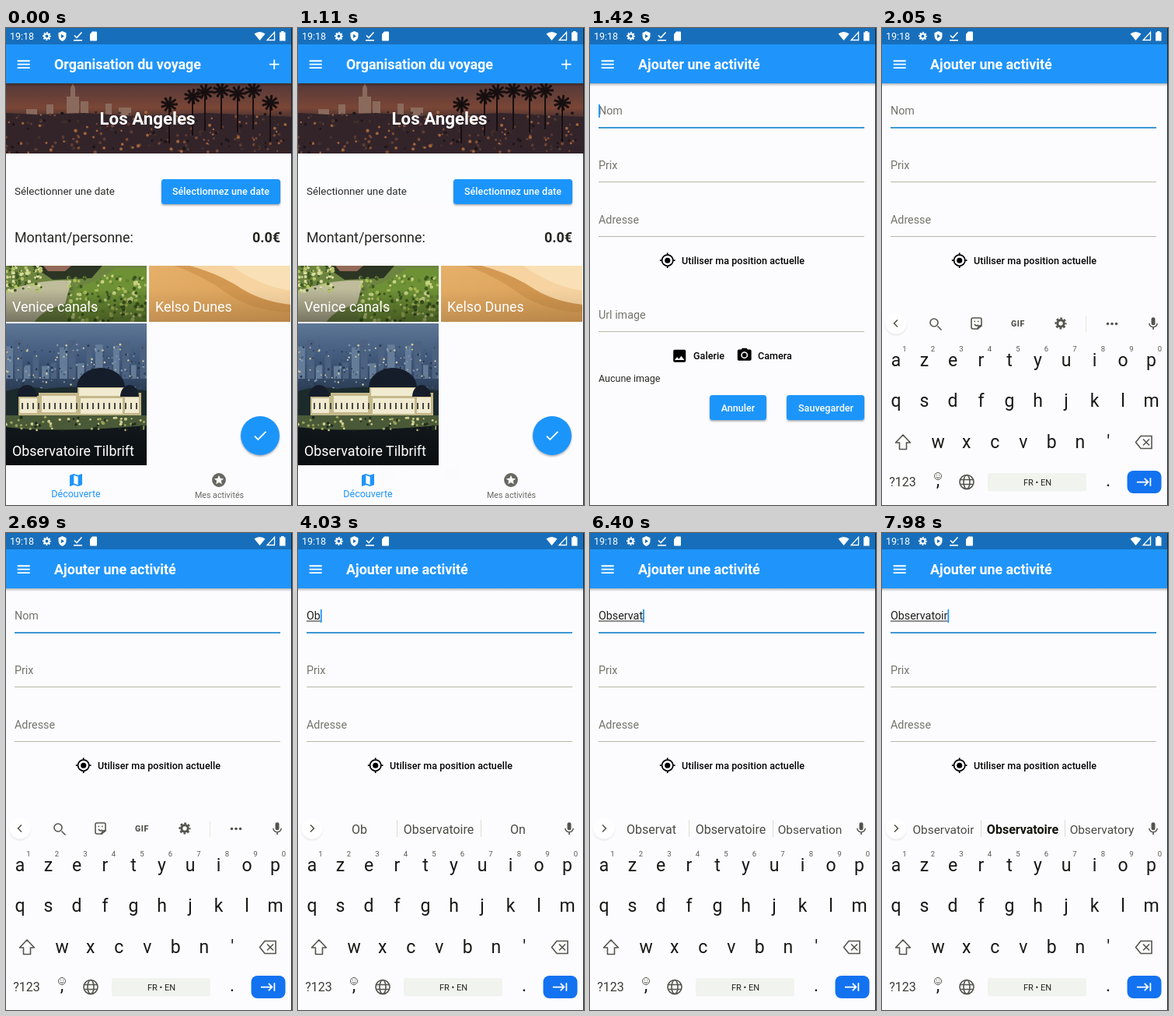
An HTML page for the animation above (8000 ms loop, 368 by 612 pixels).

```html
<!DOCTYPE html>
<html lang="fr">
<head>
<meta charset="utf-8">
<title>Organisation du voyage</title>
<style>
html, body { margin: 0; width: 100%; height: 100%; overflow: hidden; background: #fcfcfe; }
svg.stage { display: block; width: 100vw; height: 100vh; font: 14.3px Roboto, "Noto Sans", sans-serif; }
.blue { fill: #1f95fb; }
.title { font-size: 17.86px; font-weight: 600; fill: #fff; }
.btn { font-size: 12.5px; font-weight: 500; letter-spacing: .07px; }
.label { fill: #74746c; }
.tile { font-size: 17.86px; fill: #fff; }
.mid { text-anchor: middle; }
.key { font-size: 23px; text-anchor: middle; fill: #181816; }
.digit { font-size: 9.5px; text-anchor: middle; fill: #565650; }
.word { font-size: 16px; text-anchor: middle; fill: #4a4a44; }
.word.long { font-size: 15.4px; }
.word.best { font-weight: 700; fill: #14140c; }
.grey { fill: #54544e; }
.line { fill: none; stroke: #54544e; stroke-width: 1.6; }
#form { animation: rise 8s infinite, appear 8s infinite; }
#keyboard { animation: slide 8s infinite; }
@keyframes rise {
  0%, 13.69% { transform: translateY(153px); animation-timing-function: cubic-bezier(.4, 0, .2, 1); }
  17.44%, 100% { transform: none; }
}
@keyframes appear {
  0%, 13.69% { opacity: 0; animation-timing-function: ease-in; }
  17.44%, 100% { opacity: 1; }
}
@keyframes slide {
  0%, 19.5% { transform: translateY(256px); animation-timing-function: cubic-bezier(0, 0, .2, 1); }
  23%, 100% { transform: none; }
}
</style>
</head>
<body>
<svg class="stage" viewBox="0 0 368 612">
<defs>
  <symbol id="menu" viewBox="0 0 24 24"><path d="M3 18h18v-2H3zM3 13h18v-2H3zM3 6v2h18V6z"/></symbol>
  <symbol id="add" viewBox="0 0 24 24"><path d="M19 13h-6v6h-2v-6H5v-2h6V5h2v6h6z"/></symbol>
  <symbol id="check" viewBox="0 0 24 24"><path d="M9 16.17L4.83 12l-1.42 1.41L9 19 21 7l-1.41-1.41z"/></symbol>
  <symbol id="map" viewBox="0 0 24 24"><path d="M20.5 3L15 5.1 9 3 3.36 4.9Q3 5 3 5.4V20.5q0 .5.5.5L9 18.9l6 2.1 5.64-1.9q.36-.1.36-.5V3.5q0-.5-.5-.5zM15 19l-6-2.11V5l6 2.11z"/></symbol>
  <symbol id="stars" viewBox="0 0 24 24"><path d="M12 2a10 10 0 1 0 0 20a10 10 0 1 0 0-20zm4.23 16L12 15.45 7.77 18l1.12-4.81-3.73-3.23 4.92-.42L12 5l1.92 4.53 4.92.42-3.73 3.23z"/></symbol>
  <symbol id="image" viewBox="0 0 24 24"><path d="M21 19V5a2 2 0 0 0-2-2H5a2 2 0 0 0-2 2v14a2 2 0 0 0 2 2h14a2 2 0 0 0 2-2zM8.5 13.5l2.5 3 3.5-4.5 4.5 6H5z"/></symbol>
  <symbol id="camera" viewBox="0 0 24 24"><path d="M9 2L7.17 4H4a2 2 0 0 0-2 2v12a2 2 0 0 0 2 2h16a2 2 0 0 0 2-2V6a2 2 0 0 0-2-2h-3.17L15 2zm3 15a5 5 0 1 1 0-10a5 5 0 1 1 0 10z"/><circle cx="12" cy="12" r="3.2"/></symbol>
  <symbol id="locate" viewBox="0 0 24 24"><circle cx="12" cy="12" r="4"/><circle cx="12" cy="12" r="8" fill="none" stroke="#000" stroke-width="2"/><path d="M11 1h2v3h-2zM11 20h2v3h-2zM1 11h3v2H1zM20 11h3v2h-3z"/></symbol>
  <symbol id="gear" viewBox="0 0 24 24"><g fill="none" stroke="currentColor"><circle cx="12" cy="12" r="5.6" stroke-width="4"/><circle cx="12" cy="12" r="8.6" stroke-width="3" pathLength="16" stroke-dasharray="1.1 .9" stroke-dashoffset=".55"/></g></symbol>
  <symbol id="mic" viewBox="0 0 24 24"><rect x="9" y="2" width="6" height="12" rx="3"/><path d="M17.3 11a5.3 5.1 0 0 1-10.6 0H5a7 7 0 0 0 6 6.72V21h2v-3.28A7 7 0 0 0 19 11z"/></symbol>
  <symbol id="tab" viewBox="0 0 24 24"><path d="M11.59 7.41L15.17 11H1v2h14.17l-3.59 3.59L13 18l6-6-6-6zM20 6v12h2V6z"/></symbol>
  <linearGradient id="shade" x2="0" y2="1"><stop stop-opacity=".28"/><stop offset="1" stop-opacity="0"/></linearGradient>
  <linearGradient id="dusk" x2="0" y2="1"><stop stop-color="#55393a"/><stop offset=".35" stop-color="#7a4636"/><stop offset=".5" stop-color="#453030"/><stop offset="1" stop-color="#221a1c"/></linearGradient>
  <linearGradient id="haze" x2="0" y2="1"><stop stop-color="#5f7796"/><stop offset=".25" stop-color="#40587a"/><stop offset=".48" stop-color="#2c3d54"/><stop offset="1" stop-color="#0c1118"/></linearGradient>
  <linearGradient id="sand" x2="1" y2="1"><stop stop-color="#e6b06a"/><stop offset="1" stop-color="#d59a52"/></linearGradient>
  <linearGradient id="foot" x2="0" y2="1"><stop stop-opacity="0"/><stop offset="1" stop-opacity=".38"/></linearGradient>
  <filter id="soft" x="-20%" y="-30%" width="140%" height="180%"><feDropShadow dx="0" dy="1.5" stdDeviation="1.3" flood-opacity=".35"/></filter>
  <clipPath id="c-banner"><path d="M0 71h367v90H0z"/></clipPath>
  <clipPath id="c-canal"><path d="M0 305h181v72H0z"/></clipPath>
  <clipPath id="c-dune"><path d="M184 305h182v72H184z"/></clipPath>
  <clipPath id="c-dome"><path d="M0 379h181v182H0z"/></clipPath>
</defs>

<rect width="368" height="612" fill="#fcfcfe"/>
<g id="trip">
  <g clip-path="url(#c-banner)">
    <rect y="71" width="368" height="90" fill="url(#dusk)"/>
    <path fill="#8a6a5c" d="M78 113V88h5V77l3-6 3 6v11h5v25zM96 113V94h10v19zM52 113V98h9v15zM26 113v-9h14v9zM128 113V97h8v16zM145 113v-11h16v11z"/>
    <path fill="#33242a" d="M0 109l40 2 60-2 70 4 90-4 108 5v50H0z"/>
    <g id="lights"/>
    <g id="palms" stroke="#170f10"/>
  </g>
  <text class="mid" x="182" y="124" font-size="22.3" font-weight="700" fill="#fff">Los Angeles</text>
  <rect class="blue" width="368" height="71"/>
  <rect y="71" width="368" height="4" fill="url(#shade)"/>
  <use href="#menu" x="12" y="36" width="21.4" height="21.4" fill="#fff"/>
  <use href="#add" x="334.5" y="36" width="21.4" height="21.4" fill="#fff"/>
  <text class="title" x="62" y="53">Organisation du voyage</text>

  <text x="11" y="214" font-size="13.4" fill="#2c2c28">Sélectionner une date</text>
  <rect class="blue" x="200" y="194" width="153" height="32" rx="3.5" filter="url(#soft)"/>
  <text class="btn mid" x="276.5" y="214" fill="#fff">Sélectionnez une date</text>
  <text x="11" y="275" font-size="17.86" fill="#242420">Montant/personne:</text>
  <text x="353" y="275" font-size="17.86" font-weight="700" text-anchor="end" fill="#242420">0.0€</text>

  <g clip-path="url(#c-canal)">
    <rect y="305" width="181" height="72" fill="#6d8440"/>
    <path fill="#2c3524" d="M34 305h90l-14 16-50 2z"/>
    <path fill="#946a58" d="M48 305h36l-8 7H54z"/>
    <path fill="#bfbc9c" d="M0 338q40-16 84-14l-8 30q-30 8-40 24H0z"/>
    <path fill="#6f9136" d="M78 377q-4-40 28-49 22-8 34-20h41v69z"/>
    <g id="leaves"/>
    <rect y="335" width="181" height="42" fill="url(#foot)"/>
  </g>
  <g clip-path="url(#c-dune)">
    <rect x="184" y="305" width="182" height="72" fill="url(#sand)"/>
    <path fill="#f6d3a0" d="M236 305h130v50q-36-4-62-20-30-20-68-30z"/>
    <path fill="#fae0b6" d="M290 305h76v32q-40-6-76-32z"/>
    <path fill="#c98c46" opacity=".55" d="M216 305h20q38 10 68 30 26 16 62 20v10q-50-2-84-26-30-22-66-34z"/>
    <rect x="184" y="335" width="182" height="42" fill="url(#foot)" opacity=".35"/>
  </g>
  <g clip-path="url(#c-dome)">
    <rect y="379" width="181" height="182" fill="url(#haze)"/>
    <g id="towers"/>
    <g id="windows"/>
    <path fill="#1c2a2c" d="M0 466q26-8 50-3 40-6 131 2v50H0z"/>
    <path fill="#c4b88a" d="M16 472h26v-4h50v-9h60v9h22v29H16z"/>
    <path fill="#f0ead0" d="M18 475h22v19H18zM46 472h44v21H46zM94 462h56v10H94zM96 475h54v20H96zM153 474h18v20h-18z"/>
    <path stroke="#4a4a44" stroke-width="8" stroke-dasharray="2 5" d="M20 485h152" fill="none"/>
    <path fill="#161d2a" d="M91 461a31 25 0 0 1 62 0zM14 473a13 15 0 0 1 26 0zM147 473a12 15 0 0 1 24 0z"/>
    <path fill="#4a5a38" d="M0 497h181v16q-90 14-181 0z"/>
    <path fill="#10161a" d="M0 512q60 8 181-2v51H0z"/>
    <g id="garden"/>
    <rect y="515" width="181" height="46" fill="url(#foot)"/>
  </g>
  <text class="tile" x="8" y="364">Venice canals</text>
  <text class="tile" x="192" y="364">Kelso Dunes</text>
  <text class="tile" x="8" y="549">Observatoire Tilbrift</text>

  <circle class="blue" cx="327" cy="523" r="25" filter="url(#soft)"/>
  <use href="#check" x="316.3" y="512.3" width="21.4" height="21.4" fill="#fff"/>
  <use href="#map" x="79.3" y="569.3" width="21.4" height="21.4" class="blue"/>
  <use href="#stars" x="263.3" y="569.3" width="21.4" height="21.4" fill="#686862"/>
  <text class="mid blue" x="90" y="602" font-size="12.5">Découverte</text>
  <text class="mid" x="274.5" y="603" font-size="10.7" fill="#686862">Mes activités</text>
</g>

<g id="form">
  <rect width="368" height="612" fill="#fcfcfe"/>
  <rect class="blue" width="368" height="71"/>
  <rect y="71" width="368" height="4" fill="url(#shade)"/>
  <use href="#menu" x="12" y="36" width="21.4" height="21.4" fill="#fff"/>
  <text class="title" x="62" y="53">Ajouter une activité</text>
  <text class="label" id="hint" x="11" y="111">Nom</text>
  <text id="typed" x="11" y="111" fill="#20201c"></text>
  <rect id="under" x="11" y="112.5" width="0" height="1" fill="#20201c"/>
  <rect id="caret" class="blue" x="11" y="98" width="1.8" height="17"/>
  <text class="label" x="11" y="181">Prix</text>
  <text class="label" x="11" y="251">Adresse</text>
  <text class="label" x="11" y="373">Url image</text>
  <rect x="11" y="127" width="342" height="1.8" fill="#2a8fd0"/>
  <path d="M11 197.5h342M11 267.5h342M11 389.5h342" stroke="#b8b8a6"/>
  <use href="#locate" x="89" y="287.5" width="21.4" height="21.4"/>
  <text class="btn" x="118" y="303">Utiliser ma position actuelle</text>
  <use href="#image" x="104.5" y="410" width="21.4" height="21.4"/>
  <text class="btn" x="133" y="425">Galerie</text>
  <use href="#camera" x="188" y="409" width="21.4" height="21.4"/>
  <text class="btn" x="216" y="425">Camera</text>
  <text x="11" y="453.5" font-size="12.5" fill="#2c2c28">Aucune image</text>
  <rect class="blue" x="154" y="471" width="73" height="32" rx="3.5" filter="url(#soft)"/>
  <rect class="blue" x="253" y="471" width="100" height="32" rx="3.5" filter="url(#soft)"/>
  <g class="btn mid" fill="#fff"><text x="190.5" y="491.5">Annuler</text><text x="303.5" y="491.5">Sauvegarder</text></g>
</g>

<g id="keyboard">
  <rect y="356" width="368" height="260" fill="#fcfcfe"/>
  <circle cx="18" cy="379" r="13.5" fill="#fff" filter="url(#soft)" opacity=".3"/>
  <circle cx="18" cy="379" r="13.5" fill="#fefefe"/>
  <path id="chevron" class="line" d=""/>
  <use href="#mic" x="339" y="369.5" width="20" height="20" class="grey"/>
  <g id="tools">
    <path class="line" stroke-width="2" d="M71.5 382.5l5 5"/><circle class="line" cx="67" cy="378" r="5"/>
    <path class="line" d="M128 382v-8q0-2-2-2h-9q-2 0-2 2v10q0 2 2 2h6zq-5-1-5 5M119 380q2 3 5 1M118.5 376.5h1.5M123 376.5h1.5"/>
    <text class="mid grey" x="175" y="383" font-size="10.5" font-weight="900" letter-spacing=".6">GIF</text>
    <use href="#gear" x="221" y="370" width="18" height="18" color="#54544e"/>
    <path d="M262.5 370v20" stroke="#e6e6dc"/>
    <g class="grey"><circle cx="290.5" cy="379.5" r="1.8"/><circle cx="296" cy="379.5" r="1.8"/><circle cx="301.5" cy="379.5" r="1.8"/></g>
  </g>
  <g id="words">
    <path d="M127.5 368v22M235.5 368v22" stroke="#dddcd0"/>
    <text class="word" x="79" y="385.5"></text><text class="word" x="181" y="385.5"></text><text class="word" x="283" y="385.5"></text>
  </g>
  <g id="keys"></g>
  <path id="shift" class="line" d="M27 522l-9.5 10h5v8.5h9V532h5z" stroke-linejoin="round"/>
  <path class="line" d="M333 523.5h14v16h-14l-6.5-8zM336 527.5l8 8m0-8l-8 8"/>
  <text class="mid" x="26.5" y="588" font-size="16" fill="#3c3c36">?123</text>
  <text class="key" x="72" y="588">,</text>
  <g fill="none" stroke="#54544e"><circle cx="72" cy="575" r="4.5"/><path d="M69.5 576q2.5 3 5 0M70 573.5h1M73 573.5h1"/></g>
  <g class="line"><circle cx="109" cy="582.5" r="9"/><ellipse cx="109" cy="582.5" rx="4" ry="9"/><path d="M101 579.5h16M101 585.5h16"/></g>
  <rect x="136" y="571" width="127" height="23.5" rx="3" fill="#f1f3ee"/>
  <text class="mid" x="200" y="587" font-size="11" fill="#242420">FR • EN</text>
  <text class="key" x="291" y="588">.</text>
  <rect x="315.5" y="568" width="44" height="29" rx="8" fill="#1272f0"/>
  <use href="#tab" x="327" y="572" width="21" height="21" fill="#fff"/>
</g>

<rect width="368" height="21" fill="#000" opacity=".25"/>
<g fill="#fff" color="#fff">
  <text x="5" y="15" font-size="12.5">19:18</text>
  <use href="#gear" x="46" y="4" width="13" height="13"/>
  <path fill-rule="evenodd" d="M72.5 4l5 2.3v3.7q0 5-5 7-5-2-5-7V6.3zM71 8v5l4-2.5z"/>
  <path d="M88 9.5l3 3 6.5-7" fill="none" stroke="#fff" stroke-width="1.6"/><path d="M87 15h11v1.6H87z"/>
  <path d="M111 4.5h5q1 0 1 1v10q0 1-1 1h-7q-1 0-1-1V8z"/>
  <path d="M319.5 7.5q7-5 14 0L326.5 16z"/>
  <path d="M345.5 5.5v10h-9.5z" fill="none" stroke="#fff" stroke-width="1.3"/>
  <path d="M354 4h3.5v1.5h2V16.5h-7.5V5.5h2z"/>
</g>
<rect x="367" width="1" height="612" fill="#18222a"/>
</svg>

<script>
const $ = id => document.getElementById(id);
const LOOP = 8000;

function add(parent, tag, attrs, text) {
  const el = document.createElementNS('http://www.w3.org/2000/svg', tag);
  for (const k in attrs) el.setAttribute(k, attrs[k]);
  if (text) el.textContent = text;
  parent.append(el);
  return el;
}

let seed = 7;
const rnd = (a, b) => {
  seed = (seed * 16807) % 2147483647;
  return a + (b - a) * seed / 2147483647;
};

function dots(id, count, [x, y, w, h], colors, r) {
  for (let i = 0; i < count; i++) {
    add($(id), 'circle', {
      cx: rnd(x, x + w), cy: rnd(y, y + h), r: rnd(r * .5, r), fill: colors[i % colors.length]
    });
  }
}

// Scenery
dots('lights', 220, [0, 108, 368, 52], ['#7a4a34', '#3f2f2c', '#5c3c34', '#1d1618', '#a0643a'], 2.2);
dots('leaves', 190, [80, 318, 101, 59], ['#a9bc58', '#3c5620', '#c6d284', '#5e8030'], 2.6);
dots('leaves', 90, [0, 305, 46, 34], ['#b4c468', '#3f5a22', '#d8dca0'], 2.4);
dots('garden', 70, [0, 499, 181, 18], ['#9aa25a', '#1e2a20', '#d0cc90'], 2);
for (let i = 0; i < 16; i++) {
  const h = rnd(16, 50);
  add($('towers'), 'rect', { x: i * 11.5, y: 450 - h, width: rnd(6, 10), height: h, fill: i % 2 ? '#4c6280' : '#647c98' });
}
dots('windows', 170, [0, 405, 181, 58], ['#d0c8a0', '#8498b0', '#24364c', '#3c526c'], 1.5);
for (const [x, y] of [[210, 98], [240, 88], [256, 82], [277, 80], [298, 84], [318, 80], [340, 96]]) {
  add($('palms'), 'path', { d: `M${x} ${y}v50`, 'stroke-width': 2 });
  for (let a = 0; a < 9; a++) {
    const d = a * Math.PI / 4.5;
    add($('palms'), 'path', { d: `M${x} ${y}l${11 * Math.cos(d)} ${10 * Math.sin(d)}`, 'stroke-width': 3 });
  }
}

// Keyboard
const PITCH = 36.5;
const letters = [];
['azertyuiop', 'qsdfghjklm', "wxcvbn'"].forEach((row, r) => {
  [...row].forEach((ch, i) => {
    const x = 18 + (i + (r === 2 ? 1.5 : 0)) * PITCH;
    letters.push([ch, add($('keys'), 'text', { class: 'key', x: r === 2 ? x - .5 : x, y: 433.5 + r * 52.5 }, ch)]);
    if (r === 0) add($('keys'), 'text', { class: 'digit', x: x + 11, y: 415 }, String((i + 1) % 10));
  });
});

// Typing
const WORD = 'Observatoir';
const presses = [3400, 3800, 4360, 4720, 5080, 5440, 5920, 6240, 6600, 6900, 7560];
const SHIFT = 2960;

function guesses(n) {
  if (n === 1) return ['On', 'Où'];
  if (n === 2) return ['Observatoire', 'On'];
  return ['Observatoire', n < 9 ? 'Observation' : 'Observatory'];
}

const slots = [...document.querySelectorAll('.word')];
let shown = -1, upper = null;

function showWords(words) {
  words.forEach((w, i) => {
    slots[i].textContent = w;
    slots[i].classList.toggle('long', i !== 1 && w.length > 10);
  });
}

function showText(n) {
  const text = WORD.slice(0, n);
  $('typed').textContent = text;
  $('hint').style.display = n ? 'none' : '';
  $('tools').style.display = n ? 'none' : '';
  $('words').style.display = n ? '' : 'none';
  $('chevron').setAttribute('d', n ? 'M16 374.5l4.5 4.5-4.5 4.5' : 'M20 374.5l-4.5 4.5 4.5 4.5');
  const width = n ? $('typed').getComputedTextLength() : 0;
  $('under').setAttribute('width', width);
  $('caret').setAttribute('x', 11 + width);
  if (n) showWords([text, ...guesses(n)]);
  slots[1].classList.toggle('best', n === WORD.length);
}

function showCase(on) {
  for (const [ch, el] of letters) el.textContent = on ? ch.toUpperCase() : ch;
  $('shift').style.fill = on ? '#54544e' : 'none';
}

function draw(t) {
  const n = presses.filter(p => p <= t).length;
  if (n !== shown) showText(shown = n);
  const caps = t >= SHIFT && t < presses[0];
  if (caps !== upper) showCase(upper = caps);
  const since = t - (n ? presses[n - 1] : 1180);
  $('caret').style.opacity = since >= 0 && since % 1000 < 500 ? 1 : 0;
}

let start;
function tick(now) {
  start ??= now;
  draw((now - start) % LOOP);
  requestAnimationFrame(tick);
}
draw(0);
requestAnimationFrame(tick);
</script>
</body>
</html>
```
